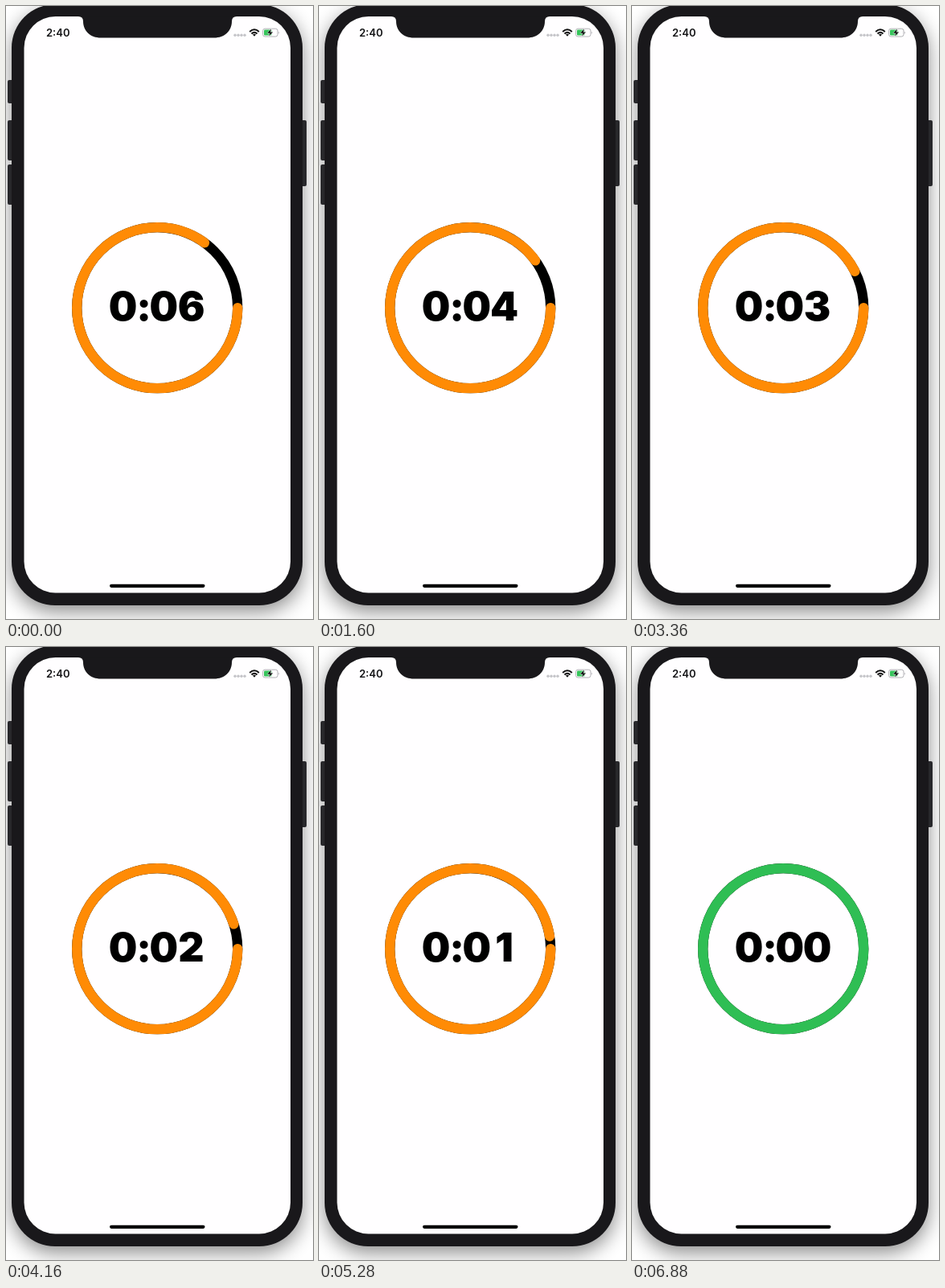
An HTML page that plays this animation: 382x762 px, repeating every 7040 ms.

```html
<!DOCTYPE html>
<html lang="en">
<head>
<meta charset="utf-8">
<title>Countdown ring</title>
<style>
  html, body { margin: 0; width: 100%; height: 100%; overflow: hidden; background: #fff; }
  svg { display: block; width: 100%; height: 100%; }
  text { font-family: Inter, sans-serif; }
  #clock { font-size: 50px; font-weight: 900; text-anchor: middle; font-feature-settings: "calt" 0; }
  #status { font-size: 13px; font-weight: 600; fill: #151517; }
  .ring { fill: none; stroke-width: 12.3; }
</style>
</head>
<body>
<svg viewBox="0 0 382 762">
  <defs>
    <filter id="blur" x="-20%" y="-20%" width="140%" height="140%">
      <feGaussianBlur stdDeviation="12"/>
    </filter>
  </defs>

  <!-- Phone -->
  <rect x="7" y="6" width="362" height="747" rx="54" opacity=".45" filter="url(#blur)"/>
  <g fill="#28282b">
    <rect x="2" y="92" width="9" height="29" rx="2"/>
    <rect x="2" y="142" width="9" height="50" rx="2"/>
    <rect x="2" y="197" width="9" height="50" rx="2"/>
    <rect x="365" y="142" width="9" height="82" rx="2"/>
  </g>
  <rect x="7" y="-2" width="362" height="747" rx="54" fill="#19181b"/>
  <rect x="22.5" y="13" width="331.5" height="716.5" rx="39" fill="#fffeff"/>
  <path d="M90 12.5V13Q96 13 96 19C96 31 105 39.5 118 39.5H259C272 39.5 281 31 281 19Q281 13 287 13V12.5Z" fill="#19181b"/>
  <rect x="129" y="718.7" width="118.5" height="4.2" rx="2.1"/>

  <!-- Status bar -->
  <text id="status" x="50" y="37.5">2:40</text>
  <g fill="#c4c4c8">
    <circle cx="285" cy="36.3" r="1.7"/>
    <circle cx="289" cy="36.3" r="1.7"/>
    <circle cx="293" cy="36.3" r="1.7"/>
    <circle cx="297" cy="36.3" r="1.7"/>
  </g>
  <g fill="none" stroke="#111" stroke-width="2">
    <path d="M303.2 32Q309 26.4 314.8 32"/>
    <path d="M305.5 34.5Q309 31.2 312.5 34.5"/>
    <path d="M307 35.6Q309 34 311 35.6L309 37.8Z" fill="#111" stroke="none"/>
  </g>
  <rect x="319.6" y="28.2" width="18.4" height="9.8" rx="2.6" fill="none" stroke="#a9a9ad" stroke-width=".9"/>
  <path d="M339.2 31.4Q341 33 339.2 34.8Z" fill="#a9a9ad"/>
  <rect x="321" y="29.6" width="9.5" height="7" rx="1.3" fill="#35c45a"/>
  <path d="M330 28.6L325 33.8H328.2L327 37.6L332.2 32.4H329Z" fill="#111" stroke="#fff" stroke-width="1" paint-order="stroke"/>

  <!-- Countdown -->
  <circle class="ring" cx="188.2" cy="375.2" r="100" stroke="#000"/>
  <circle class="ring" id="progress" cx="188.2" cy="375.2" r="100" pathLength="360" stroke-linecap="round"/>
  <text id="clock" x="145.5 171.5 196.3 230.5" y="391.3">0:06</text>
</svg>
<script>
  const LOOP = 7040, STEP = 160;
  const START = 6, FIRST_TICK = 380, SECOND = 1000, EASE = 200;
  const DEGREES_PER_SECOND = 9;
  const ORANGE = [255, 139, 5], GREEN = [47, 190, 84];

  const progress = document.getElementById("progress");
  const clock = document.getElementById("clock");
  const clamp = (v, lo, hi) => Math.min(hi, Math.max(lo, v));
  const smooth = v => v * v * (3 - 2 * v);

  function draw(time) {
    const t = Math.floor((time % LOOP) / STEP) * STEP;
    const ticks = clamp(Math.floor((t - FIRST_TICK) / SECOND) + 1, 0, START);
    const lastTick = FIRST_TICK + (ticks - 1) * SECOND;
    const eased = ticks ? smooth(clamp((t - lastTick) / EASE, 0, 1)) : 0;
    const left = START - ticks;

    const gap = DEGREES_PER_SECOND * (ticks ? left + 1 - eased : START);
    const mix = left ? 0 : eased;
    const color = ORANGE.map((c, i) => Math.round(c + (GREEN[i] - c) * mix));

    progress.setAttribute("stroke-dasharray", gap > 0 ? `${360 - gap} 400` : "none");
    progress.setAttribute("stroke", `rgb(${color})`);
    clock.textContent = `0:0${left}`;
  }

  function frame() {
    draw(performance.now());
    requestAnimationFrame(frame);
  }
  frame();
</script>
</body>
</html>
```
